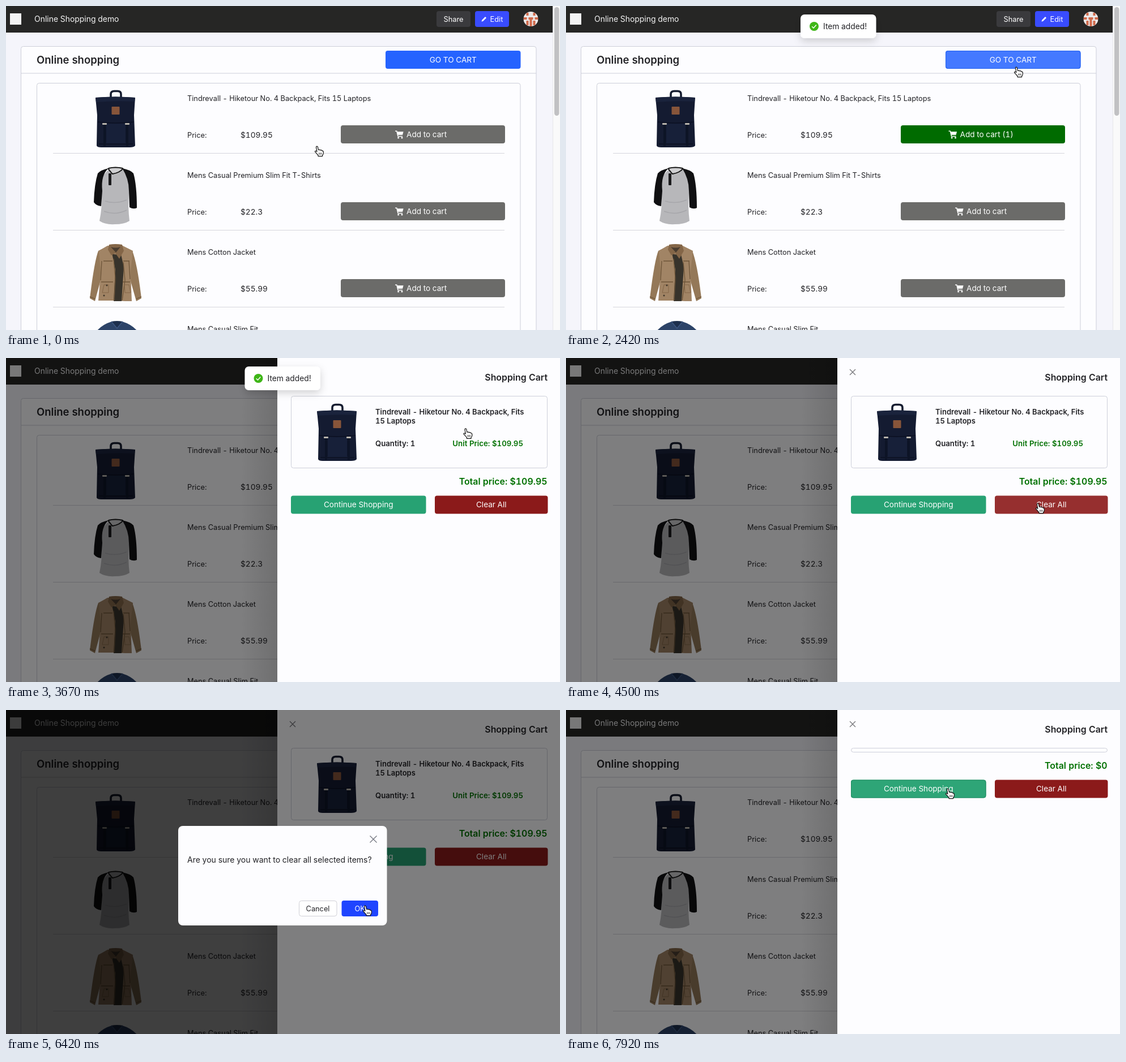
These frames come from a looping animation (978x573 px, 8000 ms). An HTML page:

```html
<!DOCTYPE html>
<html lang="en">
<head>
<meta charset="utf-8">
<title>Online shopping</title>
<style>
html, body { margin: 0; width: 100%; height: 100%; overflow: hidden; background: #f5f5fc; }
svg { display: block; }
text { font-family: Inter, Roboto, sans-serif; font-variant-numeric: tabular-nums; white-space: pre; }
</style>
</head>
<body>
<svg id="stage" width="978" height="573" viewBox="0 0 978 573"></svg>
<script>
const LOOP = 8000;
const INK = '#222226', GREEN = '#006b00', LINE = '#cdcfd9', PAPER = '#fdfdff';
const $ = id => document.getElementById(id);

// Markup helpers; text is placed by the middle of its capitals.
const text = (x, y, size, str, fill = INK, extra = '') =>
  `<text x="${x}" y="${y + size * .36}" font-size="${size}" fill="${fill}" ${extra}>${str}</text>`;
const mid = 'text-anchor="middle"', end = 'text-anchor="end" font-weight="600"', bold = 'font-weight="600"';
const rect = (x, y, w, h, fill, r = 0, extra = '') =>
  `<rect x="${x}" y="${y}" width="${w}" height="${h}" rx="${r}" fill="${fill}" ${extra}/>`;
const path = (d, fill, extra = '') => `<path d="${d}" fill="${fill}" ${extra}/>`;
const line = (d, color, w = 1, extra = '') => path(d, 'none', `stroke="${color}" stroke-width="${w}" ${extra}`);
const group = (id, body, extra = '') => `<g id="${id}" ${extra}>${body}</g>`;
const at = (x, y, body) => `<g transform="translate(${x} ${y})">${body}</g>`;
const button = (x, y, w, h, fill, label, size, hover = '') =>
  rect(x, y, w, h, fill, 4) +
  (hover && rect(x, y, w, h, '#fff', 4, `id="${hover}" opacity="0"`)) +
  text(x + w / 2, y + h / 2, size, label, '#fff', mid);
const cross = (x, y, r, color) =>
  line(`M${x - r} ${y - r}l${2 * r} ${2 * r}m0 ${-2 * r}l${-2 * r} ${2 * r}`, color, 1.3);

const cartIcon = (x, y) => at(x, y,
  path('M3.2 1.8H14.6L13 7.6H4.5Z', '#fff') +
  line('M0 .8H2.8L5 9.9H13', '#fff', 1.5) +
  '<circle cx="5.6" cy="12.4" r="1.5" fill="#fff"/><circle cx="12" cy="12.4" r="1.5" fill="#fff"/>');

const backpack = (x, y) => at(x, y,
  line('M27 15V8Q27 2.5 33 2.5H39Q45 2.5 45 8V15', '#161d30', 3.6) +
  path('M0 14Q35 11 70 14L68 45L70 99Q68 102 60 102H10Q3 102 2 99L3 45Z', '#141b31') +
  path('M0 14Q35 11 70 14L69 21Q35 19 1 22Z', '#1a233c') +
  rect(18, 60, 37, 36, '#172039', 2) +
  line('M4 57Q35 61 68 57M18 62V94M54 62V94M6 96H66', '#0b1022', 1.3) +
  rect(14, 62, 4, 38, '#0d1426') + rect(54, 62, 4, 38, '#0d1426') +
  rect(12, 59, 8, 3, '#b9b5ad', 1) + rect(52, 59, 8, 3, '#b9b5ad', 1) +
  rect(28.5, 30, 14, 14, '#87553a', 1));

const shirt = (x, y) => at(x, y,
  path('M27 3L12 20L14 45Q15 72 10 95Q20 102 37 101Q54 101 63 95Q60 72 62 45L62 20L50 3Z', '#b7b7ba') +
  path('M26 2Q12 5 7 11Q1 30 0 62Q4 68 13 69L15 42Q12 14 26 2Z', '#101012') +
  path('M50 2Q65 5 70 11Q76 32 76 72Q70 75 63 71L62 42Q62 20 50 2Z', '#101012') +
  path('M25 2Q38 -2 52 2Q48 9 33 12Z', '#d0d0d2') +
  line('M25 2Q30 9 33 12Q46 10 52 2M26 2Q38 -1 51 2', '#111', 2) +
  rect(26, 11, 5, 21, '#1a1a1c', 1) +
  line('M20 60Q38 66 58 58M18 78Q38 86 58 76', '#a6a6aa', 1.5));

const jacket = (x, y) => at(x, y,
  path('M31 4L15 12Q8 30 0 96L9 101L19 64L59 4L75 12Q84 36 91 96L82 101L71 62Z', '#947858') +
  path('M31 3L16 12L19 50L15 100H46L62 101H74L72 50L76 12L58 3Z', '#a18465') +
  path('M39 16Q47 22 54 14L60 40L56 101H42L45 45Z', '#37332b') +
  path('M34 1Q45 -1 57 1L60 12L52 26L45 16L38 20L32 10Z', '#846648') +
  path('M37 5Q45 8 54 5L46 15Z', '#4a3d30') +
  line('M24 30H40M59 30H70M19 64L21 30M71 62L69 30M20 67H41M58 67H71M42 26L45 60L43 100M59 32L62 64L57 100M0 93L9 97M91 93L82 97', '#6d5539', 1.3) +
  line('M25 72h8v14h-11zM61 72h8l3 14h-10z', '#846648', 1) +
  '<circle cx="30" cy="73" r="1.5" fill="#40362a"/><circle cx="25" cy="91" r="1.5" fill="#40362a"/>');

const tee = (x, y) => at(x, y,
  path('M-2 18Q8 6 25 1Q34 3 43 1Q60 6 70 18Z', '#2c4368') +
  path('M24 1Q34 -1 44 1L34 13Z', '#1d2f4d') +
  line('M24 1L34 13L44 1', '#3d5680', 1.5));

const BAG = 'Tindrevall - Hiketour No. 4 Backpack, Fits';
const goods = [
  [BAG + ' 15 Laptops', '$109.95'],
  ['Mens Casual Premium Slim Fit T-Shirts', '$22.3'],
  ['Mens Cotton Jacket', '$55.99'],
  ['Mens Casual Slim Fit', '$15.99']
];
const addButton = (fill, label, iconX, labelX, hover) =>
  rect(591, 211, 290, 32, fill, 4) + rect(591, 211, 290, 32, '#fff', 4, `id="${hover}" opacity="0"`) +
  cartIcon(iconX, 220.5) + text(labelX, 227.3, 13.6, label, '#fff');
const row = ([name, price], i) => at(0, 136 * i,
  text(320, 163, 12.8, name) + text(320, 228, 12.8, 'Price:') + text(414, 228, 13.7, price) +
  group('add' + i, addButton('#6b6b69', 'Add to cart', 687, 707, 'addHover' + i)) +
  line('M83 260.5H880', '#d6d6dc'));

const avatarBlocks = [[-8, -11, 4, 5], [4, -11, 4, 5], [-13, -3, 6, 4], [7, -3, 6, 4], [-4, -3, 8, 4],
  [-8, 3, 4, 8], [4, 3, 4, 8], [-2, 1, 4, 12]];
const header =
  rect(0, 0, 978, 47, '#262625') + rect(7, 13, 20, 20, '#f2f2f2') +
  text(50, 23, 13.95, 'Online Shopping demo', '#f4f4f4') +
  button(760, 9, 60, 28, '#3a3a3d', 'Share', 12.8) +
  rect(828, 9, 60, 28, '#394cff', 4) + text(854.5, 23, 12.8, 'Edit', '#fff') +
  line('M841 26L847 20', '#fff', 2.8) + path('M839.5 27.5l.6-2.6 2 2z', '#fff') +
  '<clipPath id="round"><circle r="13"/></clipPath>' +
  at(926.5, 23, `<g clip-path="url(#round)">${rect(-13, -13, 26, 26, '#ece8e8')}` +
    avatarBlocks.map(b => rect(...b, '#d0694a')).join('') + '</g>');

const page = rect(0, 0, 978, 573, '#f5f5fb') + header +
  rect(26.5, 71.5, 909.5, 530, PAPER, 4, `stroke="${LINE}"`) + line('M26 119H936', LINE) +
  text(54, 95.5, 18.5, 'Online shopping', INK, bold) +
  rect(670, 79, 238.5, 32, '#2563ff', 4, 'id="wave" stroke="#2563ff" opacity="0"') +
  button(670, 79, 238.5, 32, '#2563ff', 'GO TO CART', 13.6, 'goHover') +
  rect(670.5, 79.5, 237.5, 31, 'none', 4, 'id="goEdge" stroke="#1f5ff0" opacity="0"') +
  rect(54.5, 136.5, 853.5, 460, PAPER, 4, `stroke="${LINE}"`) +
  goods.map(row).join('') +
  group('added', addButton(GREEN, 'Add to cart (1)', 675.5, 695.5, 'addedHover')) +
  backpack(158, 148) + shirt(155, 285) + jacket(148, 421) + tee(162, 557) +
  group('scroll', rect(965, 0, 13, 573, '#fafafa') + line('M965.5 0V573', '#e6e6e9') +
    rect(968, 2, 8.5, 192, '#c1c1c3', 4.2));

const drawer = rect(415, 0, 64, 573, 'url(#shade)') + rect(479, 0, 500, 573, PAPER) + cross(506, 25, 5, '#77777b') +
  text(956, 34.5, 15.9, 'Shopping Cart', INK, end) +
  rect(503.5, 67.5, 452, 127, PAPER, 4, `id="cart" stroke="${LINE}"`) +
  group('item', backpack(549, 80) +
    text(652, 95, 13, BAG, INK, bold) + text(652, 111, 13, '15 Laptops', INK, bold) +
    text(652, 151, 13.2, 'Quantity: 1', INK, bold) + text(913, 151, 13.25, 'Unit Price: $109.95', '#007000', end)) +
  group('foot',
    '<text id="total" x="955.5" y="224.3" font-size="15.9" fill="#007000" ' + end + '></text>' +
    rect(755.5, 242, 203, 35, 'none', 5, 'id="focus" stroke="#ecdcd2" stroke-width="3"') +
    button(503, 243.5, 238.5, 32, '#27a273', 'Continue Shopping', 13.6, 'goOnHover') +
    rect(503.5, 244, 237.5, 31, 'none', 4, 'id="goOnEdge" stroke="#1f8a60"') +
    button(757, 243.5, 199.5, 32, '#8b1a1a', 'Clear All', 13.6, 'clearHover'));

const toast = rect(414, 15, 133.5, 42, '#fff', 7, 'filter="url(#soft)"') +
  '<circle cx="438" cy="36" r="8" fill="#3fb618"/>' + line('M434.2 36.2l2.8 2.8 4.8-5.4', '#fff', 1.5) +
  text(454, 36, 13.8, 'Item added!');

const modal = rect(304, 205, 368.5, 176, PAPER, 8) + cross(648.5, 228.5, 6, '#72757f') +
  text(320, 264.5, 14, 'Are you sure you want to clear all selected items?') +
  rect(517.5, 337.5, 66.5, 27, '#fff', 4, 'stroke="#d0d0d6"') + text(550.5, 351.3, 12.75, 'Cancel', INK, mid) +
  button(592.5, 337, 64.5, 28, '#1f45ff', 'OK', 12.75, 'okHover');

const hand = path('M-5.5 -7.2Q-5.5 -8.8 -4.1 -8.8Q-2.8 -8.8 -2.5 -7.2L-1.5 -2.5Q.6 -3.5 1.6 -2Q3.7 -2.8 4.5 -1.2Q7 -1.4 7.3 1V3.5Q7 5.5 5.6 7V8.6H-2V7Q-4.5 4 -7.5 .7Q-7.4 -1.3 -5.2 -.5L-4.1 .5Z',
  '#fff', 'stroke="#111" stroke-width="1.2" stroke-linejoin="round"') +
  line('M-.3 2.5V5.8M1.8 2.5V5.8M3.9 2.5V5.8', '#222', .9);

$('stage').innerHTML =
  '<filter id="soft" x="-20%" y="-50%" width="140%" height="220%"><feDropShadow dx="0" dy="5" stdDeviation="7" flood-opacity=".17"/></filter>' +
  '<linearGradient id="shade"><stop stop-opacity="0"/><stop offset="1" stop-opacity=".12"/></linearGradient>' +
  page + rect(0, 0, 978, 573, '#000', 0, 'id="mask"') + group('drawer', drawer) +
  rect(0, 0, 978, 573, '#000', 0, 'id="mask2"') + group('toast', toast) +
  group('modal', modal) + group('hand', hand);

const smooth = p => p * p * (3 - 2 * p);
const easeOut = p => 1 - (1 - p) ** 3;
// Value of a key list [[time, value], ...] at time t.
function track(t, keys, ease = p => p) {
  const i = keys.findIndex(k => k[0] > t);
  if (i < 0) return keys[keys.length - 1][1];
  if (!i) return keys[0][1];
  const [t0, a] = keys[i - 1], [t1, b] = keys[i];
  return a + (b - a) * ease((t - t0) / (t1 - t0));
}
const pulse = (t, on, off, top) => track(t, [[on, 0], [on + 120, top], [off, top], [off + 120, 0]]);

// Time, x, y of the pointer.
const route = [
  [170, 553, 257], [670, 735, 241], [1400, 735, 241], [2000, 800, 112], [2170, 800, 113], [2420, 799, 117],
  [3170, 808, 113], [3420, 811, 112], [3500, 812, 114], [4250, 838, 263], [4420, 838, 264], [4490, 837, 266],
  [5420, 837, 266], [5920, 658, 346], [6000, 658, 346], [6400, 638, 355], [7650, 638, 355], [7910, 678, 148]
];
const routeX = route.map(([t, x]) => [t, x]), routeY = route.map(([t, , y]) => [t, y]);

const opacity = (id, v) => $(id).setAttribute('opacity', v);
const show = (id, on) => $(id).setAttribute('display', on ? 'inline' : 'none');
const transform = (id, v) => $(id).setAttribute('transform', v);

function draw(t) {
  const added = t >= 1080, cleared = t >= 7080, open = t >= 3240;

  show('added', added);
  show('add0', !added);
  opacity('addHover0', pulse(t, 420, 1700, .12));
  opacity('addedHover', pulse(t, 420, 1650, .12));
  opacity('goHover', pulse(t, 1850, 9000, .14));
  opacity('goEdge', pulse(t, 1850, 9000, 1));
  opacity('wave', track(t, [[2990, 0], [3000, .35], [3230, 0]]));
  $('wave').setAttribute('stroke-width', track(t, [[3000, 1], [3170, 6]]));
  show('scroll', !open);

  opacity('mask', track(t, [[3240, 0], [3420, .35], [3600, .5]]));
  show('drawer', open);
  transform('drawer', `translate(${track(t, [[3200, 499], [3410, 0]], easeOut)} 0)`);

  opacity('toast', track(t, [[1100, 0], [1320, 1], [4080, 1], [4240, 0]]));
  transform('toast', `translate(${open ? 7.5 : 0} ${track(t, [[1100, -42], [1320, 0], [4080, 0], [4240, -42]], smooth)})`);

  show('item', !cleared);
  $('cart').setAttribute('height', cleared ? 7 : 127);
  transform('foot', `translate(0 ${cleared ? -120 : 0})`);
  $('total').textContent = 'Total price: $' + (cleared ? '0' : '109.95');
  opacity('clearHover', pulse(t, 4370, 5600, .09));
  opacity('focus', pulse(t, 4920, 5420, 1));
  opacity('goOnHover', pulse(t, 7790, 9000, .03));
  opacity('goOnEdge', pulse(t, 7790, 9000, 1));

  opacity('mask2', track(t, [[5080, 0], [5250, .1], [5400, .1], [5620, .5], [7000, .5], [7240, 0]]));
  const zoom = track(t, [[5410, .2], [5680, 1], [7000, 1], [7230, .2]], t < 6000 ? easeOut : smooth);
  show('modal', t > 5410 && t < 7230);
  opacity('modal', track(t, [[5410, 0], [5600, 1], [7000, 1], [7230, 0]]));
  transform('modal', `translate(833 259) scale(${zoom}) translate(-833 -259)`);
  opacity('okHover', track(t, [[6000, .12], [6300, 0]]));

  transform('hand', `translate(${track(t, routeX, smooth)} ${track(t, routeY, smooth)})`);
}

const start = performance.now();
function tick() {
  draw((performance.now() - start) % LOOP);
  requestAnimationFrame(tick);
}
tick();
</script>
</body>
</html>
```
